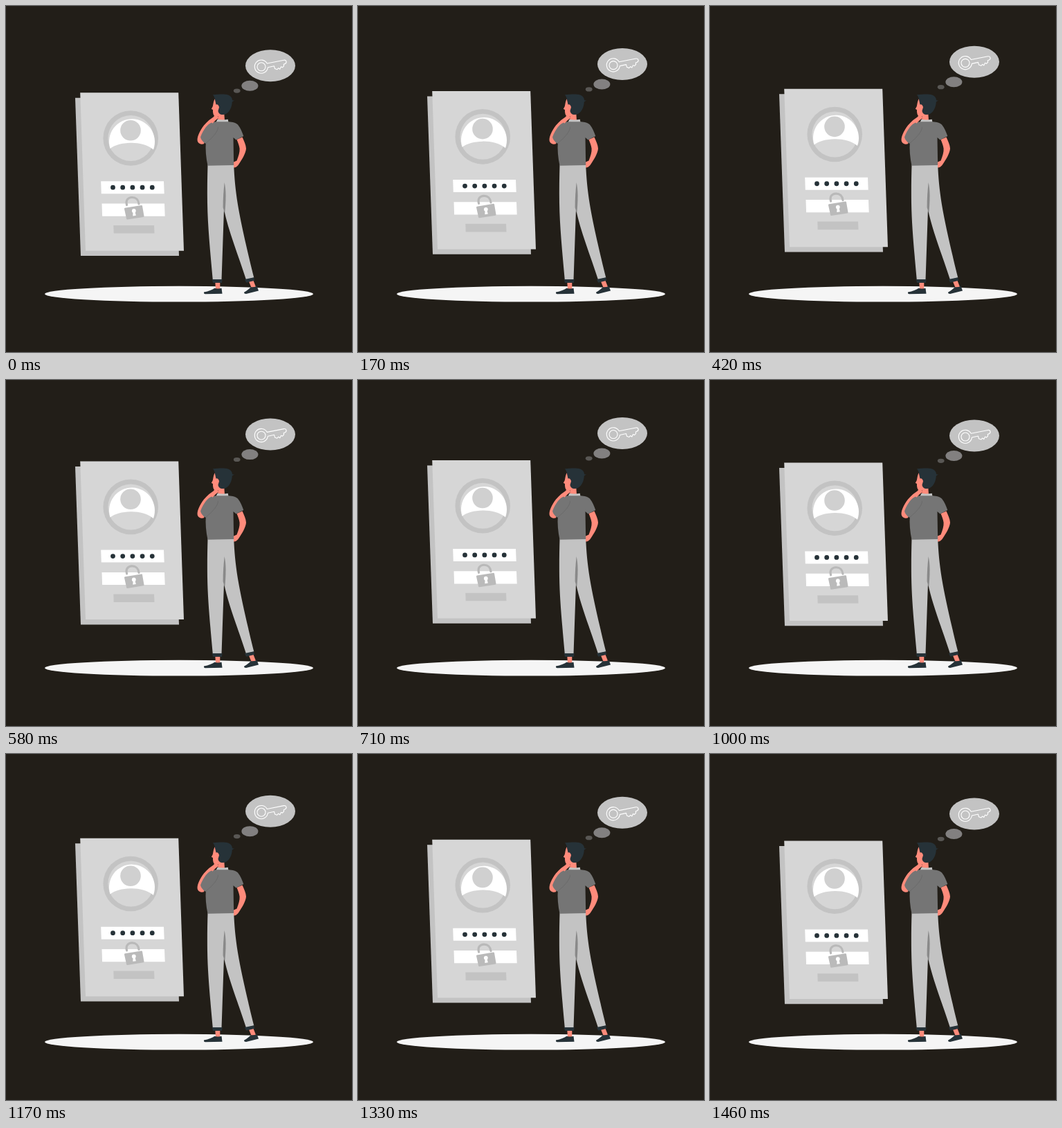
Recreate the animation shown at these times as an HTML page. Size 500 px wide and 500 px high, loop 1.5 s.

```html
<!DOCTYPE html>
<html lang="en">
<head>
<meta charset="utf-8">
<title>Forgotten password</title>
<style>
  html, body { margin: 0; width: 100%; height: 100%; overflow: hidden; background: #221e18; }
  svg { display: block; width: 100%; height: 100%; }
  .dark { fill: #263238; }
  .skin { fill: #ff8b7b; }
  .mid { fill: #c3c3c3; }
  .light { fill: #d6d6d6; }
  .white { fill: #fff; }
  .shirt { fill: #757575; }
  .line { fill: none; stroke-linecap: round; stroke-linejoin: round; }
</style>
</head>
<body>
<svg viewBox="0 0 500 500">
  <ellipse cx="250" cy="416.2" rx="194" ry="11.4" fill="#f5f5f5"/>

  <g id="floating">
    <!-- login card -->
    <path class="mid" d="M100 132.7H242L250 361H108Z"/>
    <path class="light" d="M107.2 125.2H249.2L257 353.7H115Z"/>
    <ellipse class="mid" cx="180.2" cy="191" rx="39.8" ry="39.8"/>
    <circle class="light" cx="180.4" cy="191" r="33"/>
    <path class="white" d="M150.5 206A33 33 0 1 1 213 207.500C204 200 191 197.500 180 197.800C168 198 157 201 150.500 206Z"/>
    <circle cx="180" cy="179.800" r="14.800" fill="#d0d0d0"/>
    <path class="white" d="M137.200 253.200H228L228.700 271.200H137.800ZM138.500 285.500H229L229.700 303.700H139.100Z"/>
    <path class="line" d="M154.500 262.200H211.500" stroke="#263238" stroke-width="6.800" stroke-dasharray="0 14.190"/>
    <path class="mid" d="M155.300 317H214L214.500 328.600H155.700Z"/>

    <!-- padlock -->
    <path class="line" d="M174.600 287.500C172.500 280 177 276.600 182 276.500C187.500 276.400 191.400 280 192 286" stroke="#b9b9b9" stroke-width="3.200"/>
    <path d="M172 291.800L195.600 288Q196.800 287.800 197 289L199.500 303.500Q199.700 304.700 198.500 304.900L175.500 308.500Q174.300 308.700 174.100 307.500L171 293.200Q170.800 292 172 291.800Z" fill="#bababa"/>
    <circle class="white" cx="184.800" cy="296" r="2.900"/>
    <path class="white" d="M183.600 297L186.300 296.800L187.800 302.700L183.300 303.400Z"/>

    <!-- thought bubble -->
    <ellipse class="mid" cx="382" cy="86.200" rx="36" ry="23"/>
    <ellipse cx="352.400" cy="115.200" rx="12" ry="7.500" fill="#828080"/>
    <ellipse cx="333.700" cy="122.600" rx="4.900" ry="3.100" fill="#595754"/>
    <g class="line" stroke="#fff" stroke-width="1.100">
      <circle cx="369" cy="87.800" r="6"/>
      <path d="M377.300 83L401.500 78.200Q404.300 77.800 405 80Q405.600 82.600 402.900 83.600L401.300 84.200L401.600 86.500L399.500 88.800L397.500 87.800L395.800 91.300L393.700 89.700L391.700 91.800L388.500 90.500L387.500 86.800L378.400 88.800A9.600 9.600 0 1 1 377.300 83"/>
    </g>
  </g>

  <!-- feet -->
  <path class="skin" d="M302.300 398H309.300V410H303ZM350.500 397L357 395.500L361.500 407L355 408Z"/>
  <path class="dark" d="M286 413.500C293 412.500 298 410 301.500 407.800Q306 409.200 311.500 407.800L312.500 415.700L288 416.300Q285.500 416 286 413.500ZM344 413.800C349 411 351.500 408.500 353.800 406.200Q358.500 406.800 362.600 404.800L365 411.500L347 416Q344 416 344 413.800Z"/>

  <!-- trousers -->
  <path class="mid" d="M291.500 229.500H329.200C330 248 331.500 265 335 287C340 317 350 359 358.300 392.500L347 395.500C336 361 321 324 315 294L311.500 395.800H298.800C295 353 291.500 318 291 285C290.700 265 291 247 291.500 229.500Z"/>
  <path d="M315.600 255C318 264 318.200 279 316.200 300L313.600 291C313.500 279 314.500 266 315.600 255Z" fill="#898989"/>
  <path class="dark" d="M298 395H312.500L312 400H299ZM345 395L358 392.200L359.300 396.800L347.200 399.800Z"/>

  <!-- arm on the hip -->
  <path class="skin" d="M333.500 193L341.500 189.500C344 195 346.800 201 347 206C346.500 213 341 222 335.500 230Q332 234 329 233.500V225.500L333.500 223.500C336 217 338 211 337.600 206C337 201 335 197 333.500 193Z"/>

  <!-- head and neck -->
  <path class="skin" d="M301.500 134.500C299.500 139 299.500 142 298.800 145L296.800 148.800L299 150C298.800 154 299.500 158.500 302.500 159.800L306.300 159V166Q311 168 316 165.500L315.300 155L312 140Z"/>
  <path class="dark" d="M299 128.300C307 127.500 316 126.800 321 128.500C325.500 130.500 327 133 327 136.200L330 136.500L326.800 138.500C326.500 147 322 155.500 315.500 156.800C310 157.800 307 155.500 306.500 151.500L308 146Q306.500 141 303.500 142.500L302.500 137.800C301.500 134 302 132.500 299 128.300Z"/>
  <path class="skin" d="M307.300 146.500C306.800 142.500 303.500 141.500 303.200 145C303 148.500 305.500 151 307 149.500Z"/>

  <!-- shirt -->
  <path class="mid" d="M303.500 168L305.500 163.800Q313 165.200 320.800 163.800L321.500 168.500Z"/>
  <path class="shirt" d="M295 169C299 167 305 167.200 309 167.200H322C328 167.500 332 168.500 335 171.500C339 176 341 182 343.300 188L332.500 193.500L328.500 190L329.200 230L291.500 230.800C289 219 288 207 288.800 197Z"/>

  <!-- arm at the chin -->
  <path class="skin" d="M302.500 156.500Q304.800 155.500 305.500 158L306.800 162L303 165L299 169L291 182L286 199.300Q280 201 277 196C275 191 280 180 286 172.500C291 166.500 296 163 300 160.300Z"/>
  <path class="shirt" d="M297 168.500C292 170.500 285.500 177 281 189.500Q282 194.500 288 198.800C295 193 304 184 306.500 175Z"/>
  <path class="line" d="M306.500 175C306 183 298 190.500 288.500 198.500" stroke="#646464" stroke-width=".6"/>
</svg>
<script>
  const LOOP = 1500, STEPS = 36, RISE = 9.8, LEAD = 30;
  const floating = document.getElementById('floating');

  function draw(now) {
    const step = Math.floor(((now + 4) % LOOP) * STEPS / LOOP);
    const phase = (step / STEPS + LEAD / LOOP) % 1;
    const lift = RISE * (1 - Math.abs(1 - 2 * phase));
    floating.setAttribute('transform', `translate(0 ${(0.4 - lift).toFixed(2)})`);
  }

  let start;
  function tick(now) {
    start ??= now;
    draw(now - start);
    requestAnimationFrame(tick);
  }
  draw(0);
  requestAnimationFrame(tick);
</script>
</body>
</html>
```
